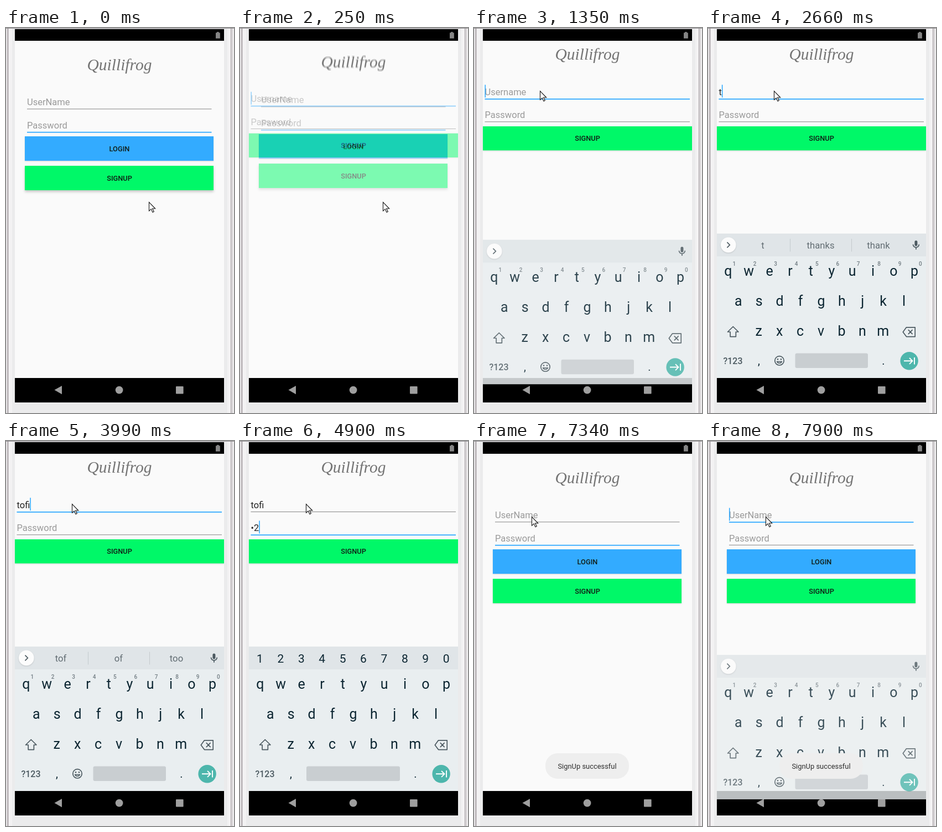
An HTML page for the animation above (8 s loop, 412 by 693 pixels).

```html
<!DOCTYPE html>
<html lang="en">
<head>
<meta charset="utf-8">
<title>Sign-up flow</title>
<style>
  html, body { margin: 0; width: 100%; height: 100%; overflow: hidden; background: #ebebeb; }
  svg { display: block; width: 412px; height: 693px; font-family: Roboto, sans-serif; }
  .logo { font: italic 29.5px "Liberation Serif", serif; fill: #747474; text-anchor: middle; }
  .field { font-size: 16.5px; }
  .label { font-size: 12.8px; font-weight: 500; fill: #101c14; text-anchor: middle; }
  .rest { filter: drop-shadow(0 1px 1px rgba(0,0,0,.14)); }
  .pressed { filter: drop-shadow(0 3px 2px rgba(0,0,0,.2)); }
  .keys text { text-anchor: middle; fill: #0b2531; }
  .keys .big { font-size: 25px; }
  .keys .digit { font-size: 21px; }
  .keys .hint { font-size: 10px; font-weight: 500; fill: #727d83; }
  .keys .word { font-size: 16.7px; fill: #626d73; }
  .keys .mode { font-size: 16px; font-weight: 500; fill: #4b5960; }
  .icon { fill: none; stroke: #4b5960; stroke-width: 1.7; }
</style>
</head>
<body>
<svg viewBox="0 0 412 693">
  <defs>
    <clipPath id="content"><rect x="16" y="23" width="378" height="607"/></clipPath>
    <clipPath id="glass"><rect x="16" y="2" width="378" height="672"/></clipPath>
  </defs>

  <g id="bezel">
    <rect width="412" height="693" fill="#ebebec"/>
    <rect width="11" height="693" fill="#f3f2f3"/>
    <rect x="400" width="12" height="693" fill="#f3f2f3"/>
    <rect width="2" height="693" fill="#e4e2e4"/>
    <rect x="2.5" width="1.5" height="693" fill="#a59fa3"/>
    <rect x="4" width="1" height="693" fill="#d2ced1"/>
    <rect x="406" width="1.5" height="693" fill="#a59fa3"/>
    <rect x="409" width="1" height="693" fill="#c2bdc0"/>
    <rect width="412" height="1" fill="#8d8a8d"/>
  </g>

  <rect x="16" y="2" width="378" height="672"/>
  <path d="M379 8.5h2.2V7h3.4v1.5h2.2v10.3h-7.8z" fill="#858585"/>
  <g clip-path="url(#content)">
    <rect x="16" y="23" width="378" height="607" fill="#fafafa"/>
    <g id="login"></g>
    <g id="signup"><rect x="16" y="-20" width="378" height="700" fill="#fafafa"/></g>
  </g>
  <g fill="#9f9f9f">
    <path d="M87.5 651.5 101 644v15.2z"/>
    <circle cx="204.6" cy="651.6" r="6.9"/>
    <rect x="307" y="645" width="13.6" height="13.4" rx="1"/>
  </g>

  <g clip-path="url(#glass)">
    <g id="keyboard" class="keys">
      <rect x="16" y="370" width="378" height="260" fill="#e9eef0"/>
      <rect x="16" y="370" width="378" height="41" fill="#e0e5e8"/>
      <g id="letters"></g>
      <path class="icon" d="M45.3 537.5 55 547h-4.6v8.6H40.200V547h-4.600z" stroke-linejoin="round"/>
      <path class="icon" d="M358.500 538.800H374.200V555.600H358.500L352.300 547.200zM361.800 543.200l7.800 8M369.600 543.200l-7.800 8" stroke-linejoin="round"/>
      <text class="mode" x="45" y="605">?123</text>
      <text class="big" style="font-size:20px" x="92" y="606">,</text>
      <text class="big" style="font-size:20px" x="317" y="606">.</text>
      <rect id="space" y="585.5" height="26.500" rx="3" fill="#c9ced1"/>
      <circle cx="363.6" cy="599.3" r="16.2" fill="#4db6ac"/>
      <path d="M354 599.300h15M364 593.800l5.500 5.500-5.500 5.500M373 593v12.600" fill="none" stroke="#fff" stroke-width="1.9"/>
      <g id="words">
        <circle class="rest" cx="36.800" cy="390.500" r="13.800" fill="#fcfcfc"/>
        <path class="icon" d="M34.500 385.700l4.800 4.800-4.800 4.800"/>
        <rect x="373.400" y="382.500" width="5" height="10" rx="2.500" fill="#4b5960"/>
        <path class="icon" d="M370.500 389.500a5.400 5.400 0 0 0 10.800 0M375.900 395v3.800" stroke-width="1.500"/>
        <g id="face">
          <circle class="icon" cx="129" cy="598.800" r="8.200"/>
          <path class="icon" d="M124.800 600.500a4.500 4.300 0 0 0 8.400 0z" stroke-width="1.300"/>
          <circle cx="126" cy="596.300" r="1.300" fill="#4b5960"/>
          <circle cx="132" cy="596.300" r="1.300" fill="#4b5960"/>
        </g>
        <g id="hints"></g>
        <g id="bar"><path d="M148.500 379.500v23M259.500 379.500v23" stroke="#c4cacd"/></g>
      </g>
      <g id="digits"></g>
    </g>
  </g>

  <g id="toast">
    <rect x="129" y="562" width="151" height="46" rx="22" fill="#eeeeee"/>
    <text x="204.500" y="590" font-size="12.900" text-anchor="middle" fill="#2e2e2e">SignUp successful</text>
  </g>
  <path id="mouse" d="M.5.5V16.300L4.200 12.800 7 18.700 9.300 17.600 6.600 12H11.700z" fill="#fff" stroke="#151515" stroke-width="1.100"/>
</svg>

<script>
const LOOP = 8000, BLUE = '#33abff', GREEN = '#00f868';
const $ = id => document.getElementById(id);

function add(parent, tag, attrs, text) {
  const el = document.createElementNS('http://www.w3.org/2000/svg', tag);
  for (const k in attrs) el.setAttribute(k, attrs[k]);
  if (text) el.textContent = text;
  return parent.appendChild(el);
}

// y is the underline; the returned function sets value, focus and caret
function field(parent, x, y, width, hint) {
  const label = add(parent, 'text', { class: 'field', x, y: y - 7 });
  const line = add(parent, 'rect', { x, y: y - .7, width });
  const caret = add(parent, 'rect', { y: y - 25.5, width: 1.6, height: 23, fill: BLUE });
  return (value, focus, blink) => {
    label.textContent = value || hint;
    label.setAttribute('fill', value ? '#242424' : '#9a9a9a');
    line.setAttribute('height', focus ? 1.8 : 1);
    line.setAttribute('fill', focus ? BLUE : '#868686');
    caret.setAttribute('x', x + (value ? label.getComputedTextLength() : 0));
    caret.setAttribute('visibility', focus && blink ? 'visible' : 'hidden');
  };
}

function button(parent, x, y, width, height, fill, text) {
  const box = add(parent, 'rect', { class: 'rest', x, y, width, height, fill });
  add(parent, 'text', { class: 'label', x: 205, y: y + height / 2 + 4.8 }, text);
  return box;
}

function row(parent, chars, x, y, cls) {
  [...chars].forEach((c, i) => add(parent, 'text', { class: cls, x: x + 37.4 * i, y }, c));
}

const login = $('login'), signup = $('signup');
add(login, 'text', { class: 'logo', x: 205, y: 76 }, 'Quillifrog');
const loginUser = field(login, 38, 146, 333.5, 'UserName');
const loginPass = field(login, 38, 187.5, 333.5, 'Password');
button(login, 34, 195, 341, 44, BLUE, 'LOGIN');
const openButton = button(login, 34, 248, 341, 44, GREEN, 'SIGNUP');

add(signup, 'text', { class: 'logo', x: 205, y: 57 }, 'Quillifrog');
const newUser = field(signup, 19.5, 127.7, 370.5, 'Username');
const newPass = field(signup, 19.5, 169, 370.5, 'Password');
const sendButton = button(signup, 16, 177, 378, 43.3, GREEN, 'SIGNUP');

row($('letters'), 'qwertyuiop', 36.3, 446, 'big');
row($('letters'), 'asdfghjkl', 54.8, 500, 'big');
row($('letters'), 'zxcvbnm', 91.8, 554, 'big');
row($('hints'), '1234567890', 47.3, 427.5, 'hint');
row($('digits'), '1234567890', 36, 399, 'digit');
const words = [99, 203.5, 308].map(x => add($('bar'), 'text', { class: 'word', x, y: 397 }));

const ticks = [0, 120, 250, 390, 520, 660, 790, 930, 1050, 1200, 1340, 1470, 2050,
  2510, 2660, 2800, 2930, 3390, 3990, 4140, 4600, 4750, 4900, 5190, 5490, 5640, 5790,
  5940, 6090, 6240, 6380, 6530, 6650, 6800, 6940, 7080, 7210, 7340, 7620, 7760, 7900];

const userText = [[0, ''], [2510, 't'], [2800, 'to'], [2930, 'tof'], [3990, 'tofi'], [6380, '']];
const passText = [[0, ''], [4600, '1'], [4750, '•'], [4900, '•2'], [5190, '••3'], [5490, '•••'], [6380, '']];
const guesses = [[0, ''], [2660, 't thanks thank'], [2800, 'to too took'], [2930, 'tof of too']];

const mousePath = [[250, 258, 313], [660, 205, 238], [1050, 119, 113], [5490, 119, 113],
  [6090, 178, 190], [6530, 201, 231], [6650, 204, 241], [6800, 204, 241], [7340, 104, 136]];
const openness = [[0, 0], [120, .25], [520, 1], [6800, 1], [7210, 0]];
const keysUp = [[1199, 0], [1200, .4], [1340, .85], [1470, 1], [6650, 1], [6800, .92],
  [6801, 0], [7899, 0], [7900, .8]];
const toastIn = [[6800, 0], [7210, 1]];

const between = (t, a, b) => t >= a && t < b;
const latest = (list, t) => list.filter(e => e[0] <= t).pop()[1];

function track(keys, t, col = 1) {
  const i = keys.findIndex(k => k[0] > t);
  if (i < 0) return keys[keys.length - 1][col];
  if (i === 0) return keys[0][col];
  const a = keys[i - 1], b = keys[i];
  return a[col] + (b[col] - a[col]) * (t - a[0]) / (b[0] - a[0]);
}

const show = (el, on) => el.setAttribute('visibility', on ? 'inherit' : 'hidden');
const place = (el, x, y, opacity = 1) => {
  el.setAttribute('transform', `translate(${x} ${y})`);
  el.setAttribute('opacity', opacity);
};

function draw(t) {
  const open = track(openness, t), up = track(keysUp, t);
  const numeric = between(t, 4140, 7340);
  const blink = !between(t, 2050, 2510) && !between(t, 3390, 3990);
  const tapped = t >= 7620;

  loginUser('', tapped, true);
  loginPass('', !tapped, false);
  newUser(latest(userText, t), !numeric, blink);
  newPass(latest(passText, t), numeric, blink);
  openButton.setAttribute('class', t < 520 ? 'pressed' : 'rest');
  sendButton.setAttribute('class', between(t, 6650, 7210) ? 'pressed' : 'rest');

  place(login, 0, -8 * open);
  place(signup, 0, 25 * (1 - open), open);
  place($('keyboard'), 0, 75 * (1 - up), up);
  place($('toast'), 0, 0, track(toastIn, t));
  place($('mouse'), track(mousePath, t), track(mousePath, t, 2));

  const guess = latest(guesses, t).split(' ');
  words.forEach((w, i) => w.textContent = guess[i] || '');
  show($('bar'), between(t, 2660, 4140));
  show($('words'), !numeric);
  show($('digits'), numeric);
  $('space').setAttribute('x', numeric ? 120 : 157.5);
  $('space').setAttribute('width', numeric ? 169 : 131.5);
}

const start = performance.now();
function frame() {
  const now = (performance.now() - start) % LOOP;
  draw(ticks.filter(k => k <= now).pop());
  requestAnimationFrame(frame);
}
frame();
</script>
</body>
</html>
```
